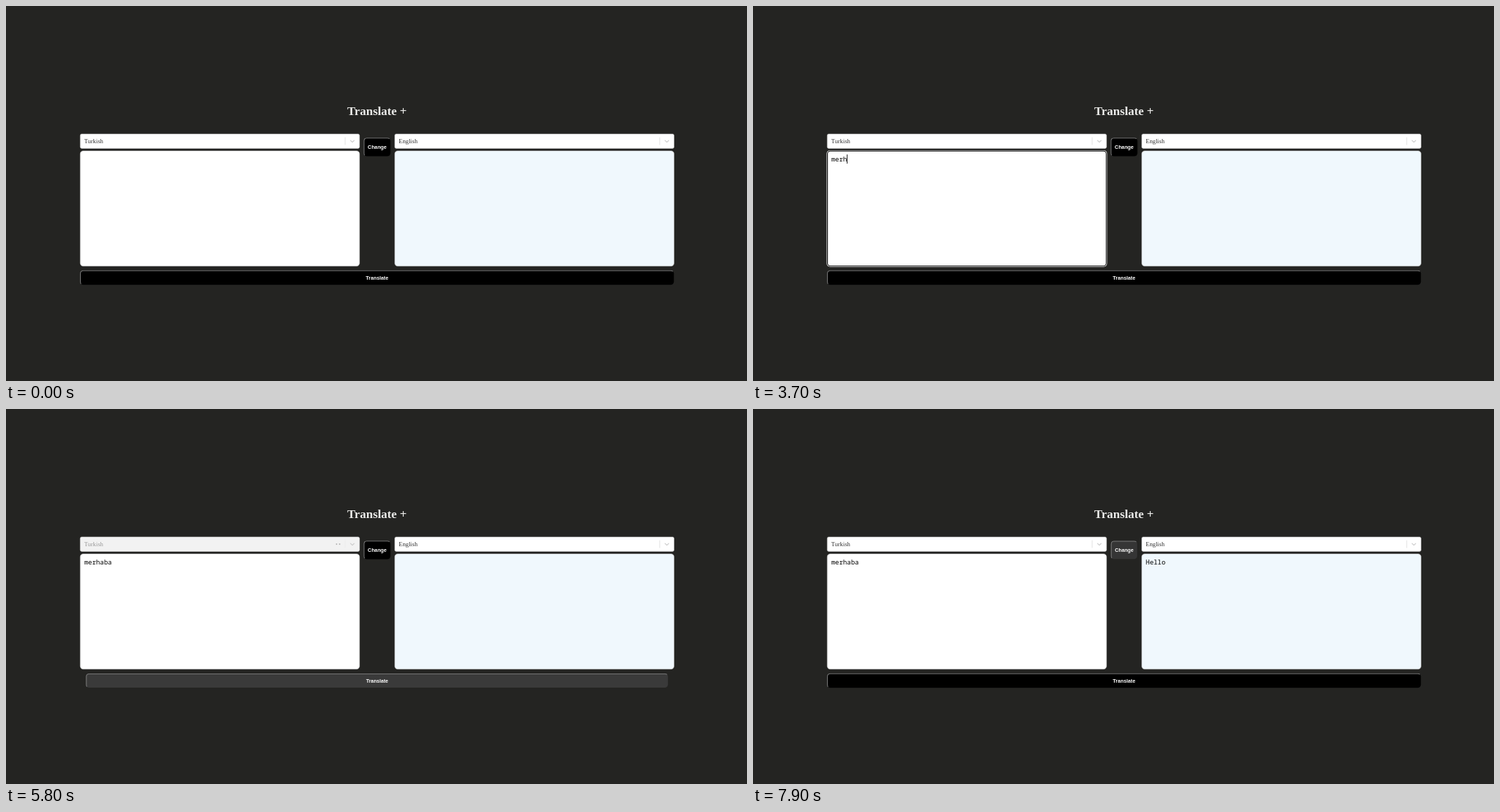
Write an HTML page that moves like this. It is 1051x533 px and loops after 8 s.

```html
<!DOCTYPE html>
<html lang="en">
<head>
<meta charset="utf-8">
<title>Translate +</title>
<style>
  html, body { margin: 0; width: 100%; height: 100%; overflow: hidden; background: #242422; }
  svg { display: block; width: 1051px; height: 533px; }
  .serif { font-family: "Liberation Serif", serif; font-size: 8.75px; fill: #333; }
  .title { font: bold 17.4px "Liberation Serif", serif; fill: #ebebe9; text-anchor: middle; }
  .mono { font-family: "Noto Sans Mono", monospace; font-size: 9.305px; fill: #000; white-space: pre; }
  .label { font: bold 7.3px "Liberation Sans", sans-serif; fill: #fff; text-anchor: middle; }
</style>
</head>
<body>
<svg id="stage" viewBox="0 0 1051 533" xmlns="http://www.w3.org/2000/svg"></svg>
<script>
const LOOP = 8000, TICK = 100;
const HOVER = 300, SHRINK = 0.02, HOVER_GREY = 58;
const TEXT_X = 111, CHAR_W = 5.583;
const CHEVRON = "M4.5 7.5c.4-.4 1-.5 1.6 0L10 11.3l3.9-3.8c.5-.5 1.1-.4 1.6 0 .4.4.4 1.2 0 1.6" +
  "L10.8 13.7c-.4.4-1.2.4-1.6 0L4.5 9.1c-.4-.4-.4-1.2 0-1.6z";

const keys = [[1500, "mö"], [3000, "m"], [3200, "me"], [3400, "mer"], [3700, "merh"],
  [3900, "merha"], [4000, "merhab"], [4100, "merhaba"]];
const caretOff = [[900, 1500], [2100, 2700], [4600, 5200]];
const focus = [400, 5700], loading = [5800, 6700];

const stage = document.getElementById("stage");

function add(tag, attrs, parent = stage, text = "") {
  const el = document.createElementNS("http://www.w3.org/2000/svg", tag);
  set(el, attrs);
  el.textContent = text;
  parent.appendChild(el);
  return el;
}
function set(el, attrs) {
  for (const k in attrs) el.setAttribute(k, attrs[k]);
}
const label = (cls, x, y, text, parent) => add("text", { class: cls, x, y }, parent, text);
const show = (el, on) => set(el, { visibility: on ? "visible" : "hidden" });
const within = (t, [a, b]) => t >= a && t < b;

function bezier(x1, y1, x2, y2) {
  const at = (s, a, b) => 3 * (1 - s) * (1 - s) * s * a + 3 * (1 - s) * s * s * b + s * s * s;
  return x => {
    if (x <= 0) return 0;
    if (x >= 1) return 1;
    let lo = 0, hi = 1;
    for (let i = 0; i < 24; i++) {
      const mid = (lo + hi) / 2;
      if (at(mid, x1, x2) < x) lo = mid; else hi = mid;
    }
    return at(lo, y1, y2);
  };
}
const ease = bezier(.25, .1, .25, 1);
const easeInOut = bezier(.42, 0, .58, 1);

function select(x, text) {
  const box = add("rect", { x: x + .3, y: 181.9, width: 396.1, height: 20.5, rx: 2.1,
    fill: "#fff", stroke: "#ccc", "stroke-width": .55 });
  const value = label("serif", x + 6, 195, text);
  const line = add("rect", { x: x + 375.7, y: 186.6, width: .6, height: 10.9, fill: "#ccc" });
  add("path", { d: CHEVRON, fill: "#ccc", transform: `translate(${x + 380.8} 186.6) scale(.547)` });
  return { box, value, line };
}

function area(x, fill) {
  add("rect", { x: x + .3, y: 205.9, width: 396.1, height: 163.8, rx: 4.2,
    fill, stroke: "#c8c8c8", "stroke-width": .55 });
}

function button(x, y, w, h, text) {
  const g = add("g", {}), r = 4.6, c = 1.4, i = .55;
  const face = add("rect", { x, y, width: w, height: h, rx: r }, g);
  // light half of the outset border, ending midway round two corners
  add("path", {
    d: `M${x + c} ${y + h - c}Q${x + i} ${y + h - r / 2} ${x + i} ${y + h - r}V${y + r}` +
       `Q${x + i} ${y + i} ${x + r} ${y + i}H${x + w - r}Q${x + w - r / 2} ${y + i} ${x + w - c} ${y + c}`,
    fill: "none", stroke: "#767676", "stroke-width": 1.1
  }, g);
  const cx = x + w / 2, cy = y + h / 2;
  label("label", cx + .2, cy + 2.6, text, g);
  return amount => {
    const s = 1 - SHRINK * amount, v = Math.round(HOVER_GREY * amount);
    set(g, { transform: `translate(${cx} ${cy}) scale(${s}) translate(${-cx} ${-cy})` });
    set(face, { fill: `rgb(${v},${v},${v})` });
  };
}

add("rect", { width: 1051, height: 533, fill: "#242422" });
label("title", 526.3, 155.2, "Translate +");
const from = select(105, "Turkish");
select(551.1, "English");
area(105, "#fff");
area(551.1, "#f0f8fd");

const ring = add("g", {});
add("rect", { x: 104.4, y: 205, width: 397.9, height: 165.7, rx: 5, fill: "#fff" }, ring);
add("rect", { x: 105.6, y: 206.2, width: 395.5, height: 163.3, rx: 4, fill: "#fff",
  stroke: "#101010", "stroke-width": 1.2 }, ring);

const typed = label("mono", TEXT_X, 221, "");
const result = label("mono", 557.1, 221, "Hello");
const caret = add("rect", { y: 211, width: 1, height: 13, fill: "#222" });
const dots = [0, 1, 2].map(i =>
  add("circle", { cx: 464.45 + i * 4.38, cy: 192.1, r: 1.1, fill: "#b8b8b8" }));

const changeButton = button(507.3, 187.2, 38, 26.3, "Change");
const translateButton = button(105, 375.7, 842.3, 20.6, "Translate");

function pulse(ms) {
  if (ms < 0) return 1;
  const p = ms % 1000 / 400;
  return p < 1 ? easeInOut(p) : 1 - easeInOut(p - 1);
}

// the dots stall briefly while the reply is awaited
const dotClock = t => t >= 6500 ? 6500 : Math.min(t, 6200);

function draw(t) {
  const focused = within(t, focus), busy = within(t, loading);
  const key = keys.filter(k => k[0] <= t).pop();
  const text = key ? key[1] : "";

  show(ring, focused);
  typed.textContent = text;
  set(caret, { x: Math.floor(TEXT_X + CHAR_W * text.length) });
  show(caret, focused && !caretOff.some(span => within(t, span)));

  set(from.box, { fill: busy ? "#f2f2f2" : "#fff", stroke: busy ? "#e6e6e6" : "#ccc" });
  from.value.style.fill = busy ? "#999" : "#333";
  set(from.line, { fill: busy ? "#e6e6e6" : "#ccc" });
  dots.forEach((dot, i) => {
    show(dot, busy);
    set(dot, { opacity: pulse(dotClock(t) - loading[0] - i * 160) });
  });
  show(result, t >= loading[1]);

  translateButton(ease((t - 5280) / HOVER) - ease((t - 5880) / HOVER));
  changeButton(ease((t - 7710) / HOVER));
}

const start = performance.now();
function frame() {
  const t = (performance.now() - start) % LOOP;
  draw(Math.floor(t / TICK) * TICK);
  requestAnimationFrame(frame);
}
frame();
</script>
</body>
</html>
```
